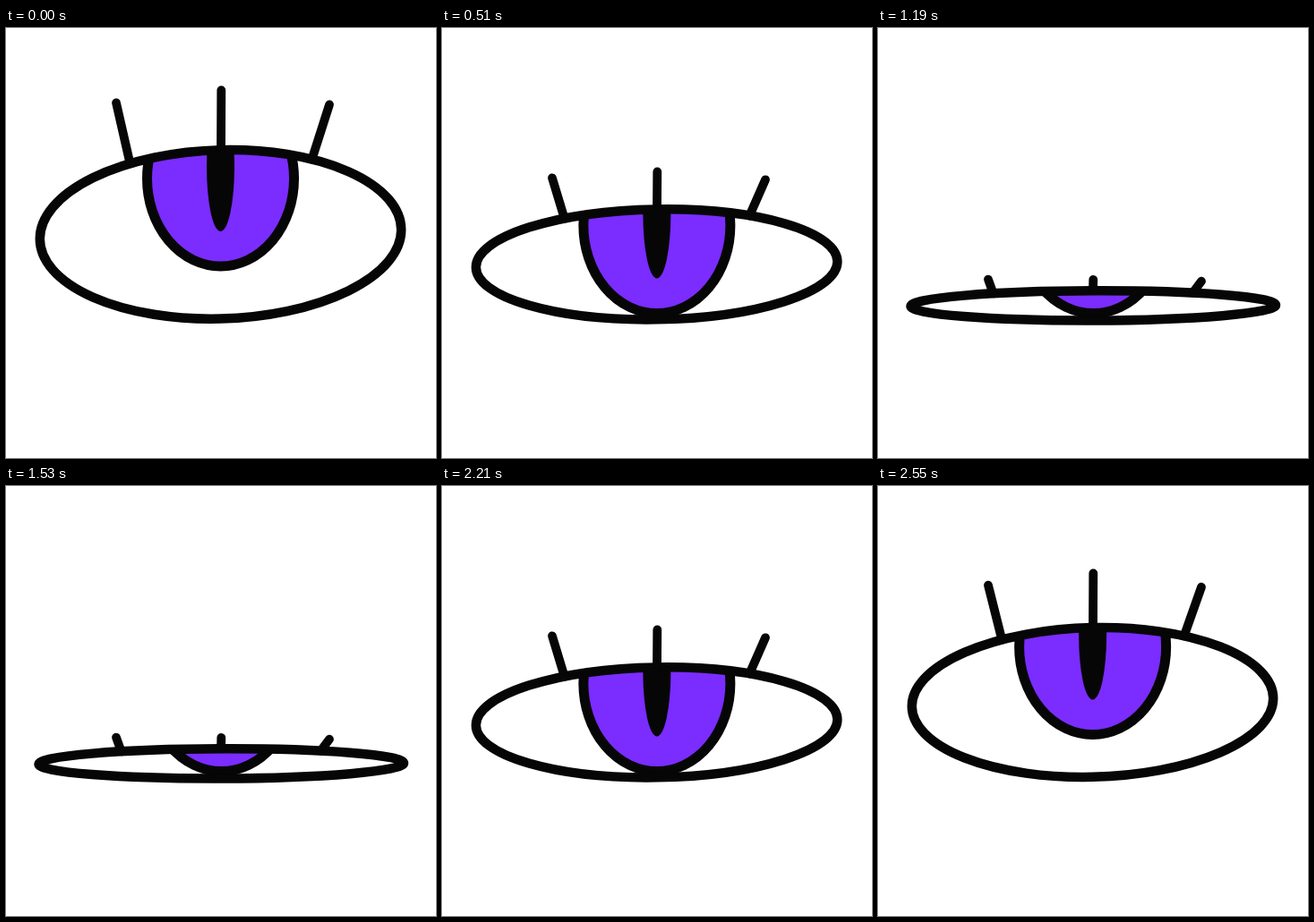
These frames come from a looping animation (480 px wide and 480 px high, 2.72 s). An HTML page with a canvas:

```html
<!DOCTYPE html>
<html lang="en">
<head>
<meta charset="utf-8">
<title>Blinking eye</title>
<style>
  html, body { margin: 0; width: 100%; height: 100%; overflow: hidden; background: #fff; }
  canvas { display: block; width: 480px; height: 480px; }
</style>
</head>
<body>
<canvas id="stage" width="480" height="480"></canvas>
<script>
const ctx = document.getElementById('stage').getContext('2d');
const INK = '#060606';
const PURPLE = '#7b2cff';
const STEP = 170;
const HALF = 8; // steps from open to closed

// Key points of the closing motion
const KEYS = [0, 2, 3, 5, HALF];
const LID_Y = [136, 180, 202.3, 252, 314];
const TIP_Y = [69.5, 125.5, 160.5, 226.5, 308];
const SIDE_DROP = [15, 13.5, 7.8, 6.5, -2];

function at(n, values) {
  const i = Math.max(1, KEYS.findIndex(k => k >= n));
  const f = (n - KEYS[i - 1]) / (KEYS[i] - KEYS[i - 1]);
  return values[i - 1] + (values[i] - values[i - 1]) * f;
}

function line(x1, y1, x2, y2) {
  ctx.beginPath();
  ctx.moveTo(x1, y1);
  ctx.lineTo(x2, y2);
  ctx.stroke();
}

function oval(x, y, rx, ry) {
  ctx.beginPath();
  ctx.ellipse(x, y, rx, ry, 0, 0, Math.PI * 2);
}

function draw(n) {
  const p = n / HALF;
  const lid = at(n, LID_Y);
  const floor = 324.7 + 2 * p;
  const cx = 239.5 + p * p;
  const cy = (lid + floor) / 2;
  const w = 201.7 + 4 * p ** 5;
  const tilt = 5 * (1 - p);
  const h = Math.sqrt(((floor - lid) / 2) ** 2 - tilt ** 2);
  const irisX = 239.5 + p;
  const irisY = Math.min(220.5, 168 + 8.5 * n + 3 * n * n); // sinks until it rests on the floor

  const lidAt = x => {
    const u = (x - cx) / w;
    return cy - tilt * u - h * Math.sqrt(1 - u * u);
  };
  const outline = () => {
    ctx.save();
    ctx.transform(w, -tilt, 0, h, cx, cy);
    ctx.beginPath();
    ctx.arc(0, 0, 1, 0, Math.PI * 2);
    ctx.restore();
  };

  ctx.fillStyle = '#fff';
  ctx.fillRect(0, 0, 480, 480);
  ctx.strokeStyle = INK;
  ctx.lineCap = 'round';

  ctx.save();
  outline();
  ctx.clip();
  ctx.lineWidth = 11;
  oval(irisX, irisY, 82, 98);
  ctx.fillStyle = PURPLE;
  ctx.fill();
  ctx.stroke();
  oval(irisX, irisY - 13, 15.5, 72);
  ctx.fillStyle = INK;
  ctx.fill();
  ctx.restore();

  ctx.lineWidth = 10.5;
  outline();
  ctx.stroke();

  ctx.lineWidth = 9.8;
  const tip = at(n, TIP_Y);
  const spread = 101.5 + 0.2 * n * n;
  for (const side of [-1, 0, 1]) {
    const root = 240 + side * spread;
    const drop = side && at(n, SIDE_DROP) + side;
    line(240.3 + side * 119 + side * side * 1.7, tip + drop, root, lidAt(root));
  }
}

const start = performance.now();

function tick() {
  const step = Math.floor((performance.now() - start) / STEP) % (2 * HALF);
  draw(Math.min(step, 2 * HALF - step));
  requestAnimationFrame(tick);
}

tick();
</script>
</body>
</html>
```
